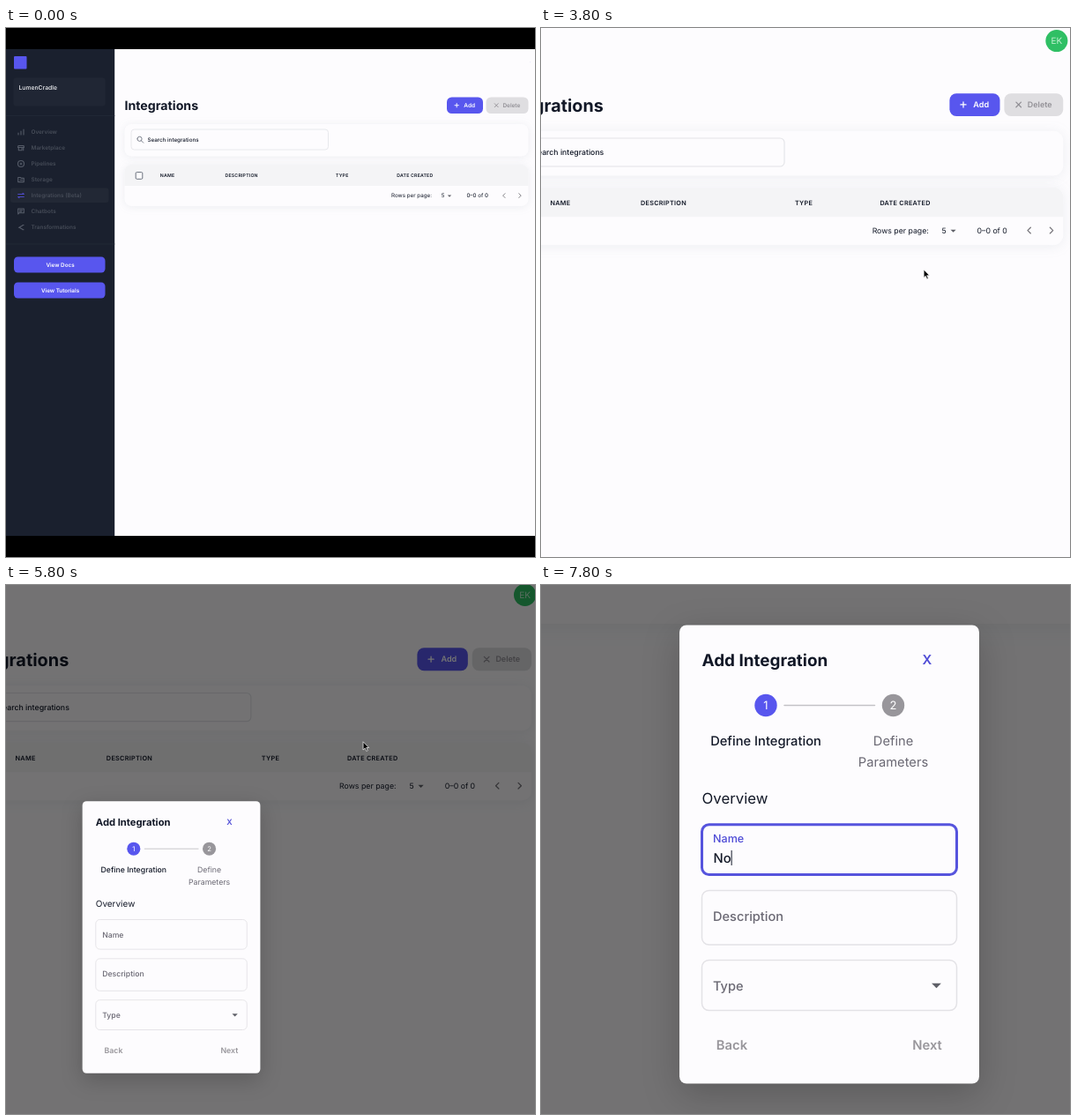
These frames come from a looping animation (600x600 px, 8 s). An HTML page:

```html
<!DOCTYPE html>
<html lang="en">
<head>
<meta charset="utf-8">
<title>Integrations</title>
<style>
  html, body { margin: 0; width: 100%; height: 100%; overflow: hidden; background: #000; }
  svg { display: block; width: 100vw; height: 100vh; font-family: Inter, sans-serif; text-rendering: geometricPrecision; }
  .card { filter: drop-shadow(0 1px 5px rgba(100, 116, 139, .11)); }
  .sheet { filter: drop-shadow(0 12px 20px rgba(0, 0, 0, .2)); }
</style>
</head>
<body>
<svg id="stage" viewBox="0 0 600 600"></svg>
<script>
const LOOP = 8000, STEP = 200;
const INDIGO = '#5856ee', INK = '#121827', PAPER = '#fdfcfe', MUTED = '#98969b', LABEL = '#6a6873', NAV = '#464c58';

// Camera positions: scale and offset of the page.
const WIDE = [1, 0, 0], TABLE = [1.393, -233.1, -35.2], FORM = [2.362, -384.1, -433];

// Markup helpers; text is centred vertically on y.
const text = (x, y, size, str, { fill = INK, weight = 500, anchor = 'start', more = '' } = {}) =>
  `<text x="${x}" y="${y + size * .36}" font-size="${size}" font-weight="${weight}" fill="${fill}" text-anchor="${anchor}" ${more}>${str}</text>`;
const middle = (x, y, size, str, fill, weight) => text(x, y, size, str, { fill, weight, anchor: 'middle' });
const box = (x1, y1, x2, y2, r, fill, more = '') =>
  `<rect x="${x1}" y="${y1}" width="${x2 - x1}" height="${y2 - y1}" rx="${r}" fill="${fill}" ${more}/>`;
const line = (d, color, width = 1) =>
  `<path d="${d}" fill="none" stroke="${color}" stroke-width="${width}" stroke-linecap="round" stroke-linejoin="round"/>`;
const disc = (x, y, r, fill) => `<circle cx="${x}" cy="${y}" r="${r}" fill="${fill}"/>`;
const caretDown = (x, y, w, fill) => `<path d="M${x - w} ${y - w / 2}h${2 * w}l${-w} ${w}z" fill="${fill}"/>`;
const spinner = (x, y, r, width) =>
  `<circle class="spinner" cx="${x}" cy="${y}" r="${r}" fill="none" stroke="${INDIGO}" stroke-width="${width}" pathLength="126.9"/>`;

// Icons are drawn around their own centre.
const navItems = [
  ['Overview', 'M-3 3V1M0 3V-1M3 3V-3'],
  ['Marketplace', 'M-3-2.5H3L3.5-.5H-3.5zM-2.7 0V2.7H1V0M2.7 0V2.7'],
  ['Pipelines', 'M-3.5 0a3.5 3.5 0 1 0 7 0a3.5 3.5 0 1 0-7 0M-1 0H1M0-1V1'],
  ['Storage', 'M-3.3-2.5H-.7L.2-1.6H3.3V2.6H-3.3zM-1 .5H2'],
  ['Integrations (Beta)', 'M-3.3-1.5H3.3L2-2.7M3.3 1.5H-3.3L-2 2.7'],
  ['Chatbots', 'M-3.3 3V-3H3.3V1.7H-2zM-1.5-1.2H1.5M-1.5.2H.7'],
  ['Transformations', 'M2.5-2.5L-2 .2L2.5 2.7M-2.6 .2H-1.6M2-2.5H3M2 2.7H3']
];

function sidebar() {
  const items = navItems.map(([name, icon], i) => {
    const y = 118 + 18 * i, active = i === 4;
    return `<g transform="translate(17 ${y})">${line(icon, active ? '#4d4ac4' : '#565c69', 1.1)}</g>` +
      text(28.5, y, 6.4, name, { fill: NAV, weight: 600 });
  }).join('');
  const button = (y, label) => box(9, y, 112.5, y + 18, 4.5, INDIGO) + middle(61.5, y + 9, 6.3, label, '#fff', 600);
  return box(0, 24, 123.2, 576, 0, '#1a202e') +
    box(9, 32, 23.5, 46.5, 1, INDIGO) +
    box(8.5, 56.5, 112.5, 88.5, 3, '#202634') +
    text(14.5, 67.5, 6.8, 'LumenCradle', { fill: '#f4f5f8' }) +
    `<g class="loading">${spinner(17, 78, 2.2, .7)}</g>` +
    line('M0 99.5H123M0 245H123', '#262c39', .6) +
    box(5, 181.5, 116.5, 198, 3, '#222835') + items +
    button(259.5, 'View Docs') + button(288.5, 'View Tutorials');
}

function page() {
  const heads = [[174.8, 'NAME'], [248.5, 'DESCRIPTION'], [374, 'TYPE'], [443.3, 'DATE CREATED']]
    .map(([x, s]) => text(x, 167.5, 5.2, s, { weight: 600, more: 'letter-spacing=".2"' })).join('');
  return box(0, 24, 600, 576, 0, PAPER) + sidebar() +
    `<g class="loading">${spinner(592, 35.5, 4.2, .9)}</g>` +
    `<g id="avatar">${disc(587.2, 35.7, 9, '#2fbf64')}${middle(587.2, 35.7, 7.2, 'EK', '#c4f0d2', 400)}</g>` +
    text(134.5, 88, 14.2, 'Integrations', { weight: 700 }) +
    box(500, 78.5, 541, 97, 5.5, INDIGO) + line('M509 87.7H513.4M511.2 85.5V89.9', '#fff', .9) +
    text(519.3, 87.7, 6.5, 'Add', { fill: '#fff', weight: 600 }) +
    box(544.5, 78.5, 592.5, 97, 5.5, '#dfdee1') + line('M554.2 85.7l4 4m0-4l-4 4', '#929096', .9) +
    text(563.5, 87.7, 6.4, 'Delete', { fill: '#929096', weight: 600 }) +
    box(134.5, 109, 592.5, 145.5, 8, PAPER, 'class="card"') +
    box(142, 115, 365.5, 138, 3.5, PAPER, 'stroke="#e3e4e8" stroke-width=".8"') +
    line('M148.9 125.8a2.6 2.6 0 1 0 5.2 0a2.6 2.6 0 1 0-5.2 0M153.4 127.8l2.4 2.4', '#5f6573', .8) +
    text(160.4, 126.5, 6.25, 'Search integrations') +
    box(134.5, 155, 592.5, 202, 8, PAPER, 'class="card"') +
    `<path d="M134.5 179V163a8 8 0 0 1 8-8H584.5a8 8 0 0 1 8 8V179z" fill="#f4f4f6"/>` +
    box(147.2, 163.6, 154.8, 171.3, 1.2, PAPER, 'stroke="#5b6270" stroke-width=".9"') + heads +
    text(437, 190, 6.25, 'Rows per page:', { weight: 400 }) +
    text(493.7, 190, 6.25, '5', { weight: 400 }) + caretDown(503, 190.6, 2.2, '#5f6068') +
    text(522.4, 190, 6.25, '0–0 of 0', { weight: 400 }) +
    line('M566 187.7l-2.4 2.4 2.4 2.4M581.8 187.7l2.4 2.4-2.4 2.4', '#77757b', .9);
}

// The dialog is laid out at the size it has in the closest camera position.
function dialog() {
  const field = (id, y1, y2) => box(182.5, y1, 471.5, y2, 8, PAPER, `id="${id}" stroke="#e3e2e6" stroke-width="1.5"`);
  return box(157, 45.5, 497, 565.5, 8, PAPER, 'class="sheet"') +
    text(182.5, 85.5, 18.9, 'Add Integration', { weight: 700 }) +
    middle(438, 84.5, 15, 'X', '#4f4cd6', 600) +
    line('M276 136.5H378.5', '#c2c1c5', 1.5) +
    disc(255, 136.5, 12.7, INDIGO) + middle(255, 136.5, 13, '1', '#fff', 400) +
    disc(399.5, 136.5, 12.7, MUTED) + middle(399.5, 136.5, 13, '2', '#fff', 400) +
    middle(255, 177, 14.7, 'Define Integration', INK, 500) +
    middle(399.5, 177, 14.7, 'Define', LABEL, 400) + middle(399.5, 200.5, 14.7, 'Parameters', LABEL, 400) +
    text(182.5, 242, 16.8, 'Overview', { weight: 400 }) +
    field('nameField', 271.8, 328.5) + field('descriptionField', 346.5, 408) + field('typeField', 425.5, 482.5) +
    `<text id="nameLabel" x="195" font-weight="500">Name</text>` +
    text(195.5, 309.5, 14.8, '<tspan id="typed"></tspan>') +
    `<path id="caret" d="M0 301V318" stroke="${INK}"/>` +
    text(195, 376, 14.6, 'Description', { fill: LABEL }) + text(195, 454.5, 14.6, 'Type', { fill: LABEL }) +
    caretDown(448.5, 454.5, 5.4, '#5f6068') +
    middle(216.5, 522, 14.8, 'Back', MUTED, 600) + middle(438, 522, 14.8, 'Next', MUTED, 600);
}

const $ = id => document.getElementById(id);
$('stage').innerHTML = `<g id="camera">${page()}
  ${box(0, 24, 600, 576, 0, '#000', 'id="backdrop"')}
  <g id="dialog" transform="scale(${1 / FORM[0]}) translate(${-FORM[1]} ${-FORM[2]})">${dialog()}</g>
  <g id="cursor">
    <path id="arrow" d="M0 0V6.6L1.5 5.2 2.6 7.6 3.7 7.1 2.6 4.8H4.7z" fill="#000" stroke="#fff" stroke-width=".5"/>
    <g id="beam">${line('M-1.4-3.5Q0-3.5 0-2.7Q0-3.5 1.4-3.5M0-2.7V2.7M-1.4 3.5Q0 3.5 0 2.7Q0 3.5 1.4 3.5', '#222', .7)}</g>
  </g></g>`;

const ramp = (t, start, length) => Math.min(1, Math.max(0, (t - start) / length));
const smooth = u => u * u * (3 - 2 * u);
const mix = (a, b, p) => a + (b - a) * p;
const mixAll = (a, b, p) => a.map((v, i) => mix(v, b[i], p));
const show = (el, on) => el.style.display = on ? '' : 'none';

// Pointer stops in page coordinates: time, x, y.
const stops = [[2400, 188, 342], [2800, 194, 334], [3700, 479, 222], [3800, 479, 222],
  [4700, 516, 92], [5600, 516, 92], [6200, 285.6, 333], [6900, 265, 314]];

function pointerAt(t) {
  const next = stops.findIndex(s => s[0] > t);
  if (next < 0) return stops.at(-1).slice(1);
  if (next === 0) return stops[0].slice(1);
  const a = stops[next - 1], b = stops[next];
  return mixAll(a, b, smooth(ramp(t, a[0], b[0] - a[0]))).slice(1);
}

// Indeterminate progress ring: the dash grows, then its tail catches up.
function turnSpinners(t) {
  const u = t / 1400 % 1;
  const grow = smooth(Math.min(1, u * 2)), chase = smooth(Math.max(0, u * 2 - 1));
  document.querySelectorAll('.spinner').forEach(ring => {
    const x = ring.getAttribute('cx'), y = ring.getAttribute('cy');
    ring.setAttribute('stroke-dasharray', `${mix(1, 100, grow)} 200`);
    ring.setAttribute('stroke-dashoffset', -15 * grow - 110 * chase);
    ring.setAttribute('transform', `rotate(${45 + 360 * u} ${x} ${y})`);
  });
}

function render(t) {
  const view = mixAll(mixAll(WIDE, TABLE, smooth(ramp(t, 2300, 900))), FORM, smooth(ramp(t, 5750, 900)));
  $('camera').setAttribute('transform', `translate(${view[1]} ${view[2]}) scale(${view[0]})`);

  const loading = t < 2200;
  document.querySelectorAll('.loading').forEach(el => show(el, loading));
  show($('avatar'), !loading);
  turnSpinners(t);

  const opened = smooth(ramp(t, 5430, 225));
  $('backdrop').setAttribute('opacity', .545 * opened);
  $('dialog').setAttribute('opacity', opened);

  const [x, y] = pointerAt(t), overField = t >= 6100;
  $('cursor').setAttribute('transform', `translate(${x} ${y})`);
  show($('cursor'), t >= 2400 && t < 7500);
  show($('arrow'), !overField);
  show($('beam'), overField);
  $('descriptionField').setAttribute('fill', t >= 6200 && t < 6600 ? '#f0f0f1' : PAPER);

  const focus = smooth(ramp(t, 7250, 200)), focused = focus > 0;
  const size = mix(14.6, 12.6, focus);
  $('nameField').setAttribute('stroke', focused ? '#5654dd' : '#e3e2e6');
  $('nameField').setAttribute('stroke-width', focused ? 3 : 1.5);
  $('nameLabel').setAttribute('font-size', size);
  $('nameLabel').setAttribute('y', mix(300.5, 287, focus) + size * .36);
  $('nameLabel').setAttribute('fill', focused ? '#4f4cd6' : LABEL);
  $('typed').textContent = 'No'.slice(0, Math.max(0, Math.floor((t - 7400) / 200)));
  show($('caret'), focused);
  $('caret').setAttribute('transform', `translate(${196 + $('typed').getComputedTextLength()} 0)`);
}

function tick() {
  render(Math.floor(performance.now() % LOOP / STEP) * STEP);
  requestAnimationFrame(tick);
}
tick();
</script>
</body>
</html>
```
